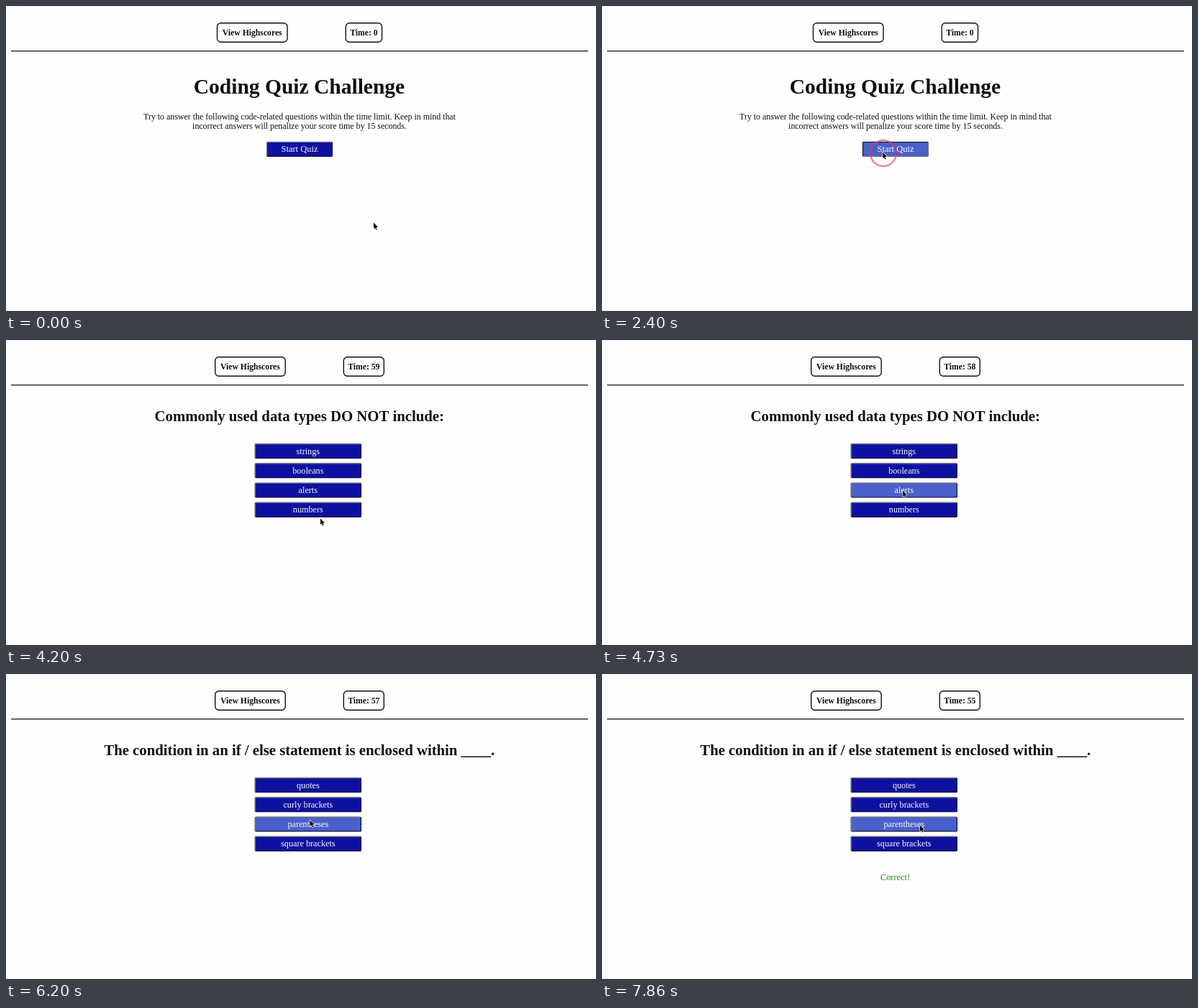
Recreate the animation shown at these times as an HTML page with a canvas. Size 820 px wide and 426 px high, loop 8000 ms.

```html
<!DOCTYPE html>
<html lang="en">
<head>
<meta charset="utf-8">
<title>Coding quiz</title>
<style>
  html, body { margin: 0; width: 100%; height: 100%; overflow: hidden; background: #fefefe; }
  canvas { display: block; }
</style>
</head>
<body>
<canvas width="820" height="426"></canvas>
<script>
const ctx = document.querySelector('canvas').getContext('2d');
const LOOP = 8000;
const SERIF = '"Liberation Serif", serif';
const INK = '#101012';

const START_CLICK = 2430;
const FIRST_ANSWER = 5080;
const NEXT_QUESTION = 6080;
const SECOND_ANSWER = 7540;
const CLICKS = [START_CLICK, FIRST_ANSWER, SECOND_ANSWER];

const QUESTIONS = [
  { title: 'Commonly used data types DO NOT include:',
    answers: ['strings', 'booleans', 'alerts', 'numbers'] },
  { title: 'The condition in an if / else statement is enclosed within ____.',
    answers: ['quotes', 'curly brackets', 'parentheses', 'square brackets'] }
];

// Pointer stops: time, x, y
const PATH = [
  [0, 511, 301], [80, 511, 301], [800, 408, 197], [1330, 402, 199], [1660, 402, 199],
  [2000, 390, 203], [2600, 390, 203], [3060, 384, 210], [3460, 378, 217], [3860, 402, 272],
  [4200, 437, 248], [4700, 418, 209], [6080, 418, 209], [6400, 432, 190], [6640, 470, 157],
  [6840, 516, 190], [6990, 490, 234], [7130, 461, 206], [7460, 442, 210], [LOOP, 442, 210]
];

function pointerAt(t) {
  const i = PATH.findIndex(stop => stop[0] > t);
  const [t0, x0, y0] = PATH[i - 1];
  const [t1, x1, y1] = PATH[i];
  const u = (t - t0) / (t1 - t0);
  const k = u * u * (3 - 2 * u);
  return { x: x0 + (x1 - x0) * k, y: y0 + (y1 - y0) * k };
}

function text(string, x, y, size, color = INK, weight = 'normal') {
  ctx.font = `${weight} ${size}px ${SERIF}`;
  ctx.textAlign = 'center';
  ctx.fillStyle = color;
  ctx.fillText(string, x, y);
}

function polygon(points) {
  ctx.beginPath();
  points.forEach(([x, y]) => ctx.lineTo(x, y));
  ctx.closePath();
}

function headerBox(label, x, width) {
  ctx.beginPath();
  ctx.roundRect(x, 23.8, width, 26.4, 5);
  ctx.strokeStyle = INK;
  ctx.lineWidth = 1.4;
  ctx.stroke();
  text(label, x + width / 2, 41, 11.7, INK, 'bold');
}

function button(label, x, y, w, h, size, pointer, pressed) {
  const hover = pointer.x >= x && pointer.x <= x + w && pointer.y >= y && pointer.y <= y + h;
  const edges = ['#6f7484', '#17173c'];
  if (pressed && hover) edges.reverse();
  ctx.save();
  ctx.beginPath();
  ctx.roundRect(x, y, w, h, 2);
  ctx.clip();
  ctx.fillStyle = edges[1];
  ctx.fillRect(x, y, w, h);
  polygon([[x, y], [x + w, y], [x + w - h / 2, y + h / 2], [x + h / 2, y + h / 2], [x, y + h]]);
  ctx.fillStyle = edges[0];
  ctx.fill();
  ctx.fillStyle = hover ? '#4a60ca' : '#0e11a0';
  ctx.fillRect(x + 1.4, y + 1.4, w - 2.8, h - 2.8);
  ctx.restore();
  text(label, x + w / 2, y + h / 2 + 3.8, size, '#f8f8ff');
}

function drawHeader(t) {
  const ticks = Math.floor((t - START_CLICK) / 1000);
  const running = ticks > 0;
  headerBox('View Highscores', running ? 290.7 : 293.5, 97.5);
  headerBox(`Time: ${running ? 60 - ticks : 0}`, running ? 469.3 : 472.2, running ? 56 : 50.3);
  ctx.fillStyle = '#2a2a2c';
  ctx.fillRect(7, 62, 802, 1.4);
}

function drawIntro(pointer, pressed) {
  text('Coding Quiz Challenge', 407.5, 122, 29.5, INK, 'bold');
  text('Try to answer the following code-related questions within the time limit. Keep in mind that',
    408, 158, 11.9);
  text('incorrect answers will penalize your score time by 15 seconds.', 408, 171.3, 11.9);
  button('Start Quiz', 361.8, 188.7, 92.4, 21.3, 12.5, pointer, pressed);
}

function drawQuestion(t, pointer, pressed) {
  const { title, answers } = QUESTIONS[t < NEXT_QUESTION ? 0 : 1];
  text(title, 407.8, 113, 20.75, INK, 'bold');
  answers.forEach((label, i) =>
    button(label, 345.5, 144 + 27.2 * i, 148.6, 21.4, 12.2, pointer, pressed));
  const answered = t >= SECOND_ANSWER || (t >= FIRST_ANSWER && t < NEXT_QUESTION);
  if (answered) text('Correct!', 407.5, 287, 12.3, '#1c8a1c');
}

function drawPointer({ x, y }, ring) {
  if (ring) {
    ctx.beginPath();
    ctx.arc(x + 1, y + 2, 18, 0, Math.PI * 2);
    ctx.strokeStyle = 'rgba(226, 60, 84, 0.62)';
    ctx.lineWidth = 2.4;
    ctx.stroke();
  }
  ctx.save();
  ctx.translate(x, y + 0.5);
  polygon([[0, 0], [0, 8.6], [1.9, 6.9], [3.2, 10], [4.6, 9.4], [3.3, 6.4], [5.8, 6.2]]);
  ctx.lineJoin = 'round';
  ctx.strokeStyle = '#fff';
  ctx.lineWidth = 1.2;
  ctx.stroke();
  ctx.fillStyle = '#000';
  ctx.fill();
  ctx.restore();
}

function draw(now) {
  const t = now % LOOP;
  const pointer = pointerAt(t);
  const pressed = CLICKS.some(c => t >= c - 90 && t < c);
  const ring = CLICKS.some(c => t >= c - 90 && t < c + 60);

  ctx.fillStyle = '#fefefe';
  ctx.fillRect(0, 0, 820, 426);
  ctx.fillStyle = '#f3f3f3';
  ctx.fillRect(0, 0, 820, 1);
  ctx.fillStyle = '#0a0a0a';
  ctx.fillRect(0, 424.8, 820, 1.2);

  drawHeader(t);
  if (t < START_CLICK) drawIntro(pointer, pressed);
  else drawQuestion(t, pointer, pressed);
  drawPointer(pointer, ring);
}

const begin = performance.now();
function frame() {
  draw(performance.now() - begin);
  requestAnimationFrame(frame);
}
frame();
</script>
</body>
</html>
```
